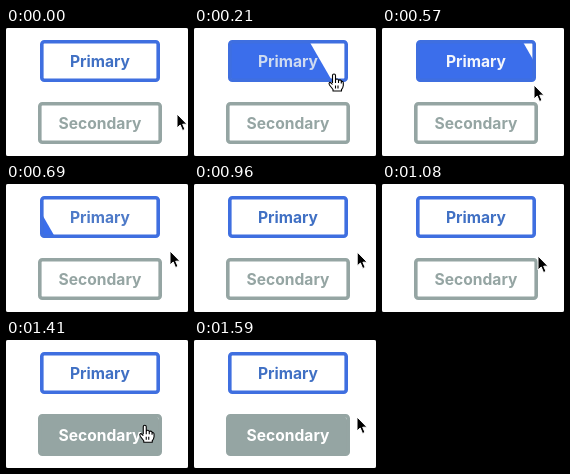
Animation, 182 px wide and 128 px high, one loop 1620 ms. Source, as an HTML page:

```html
<!DOCTYPE html>
<html lang="en">
<head>
<meta charset="utf-8">
<title>Button hover wipe</title>
<style>
  html, body { margin: 0; height: 100%; overflow: hidden; background: #fff; }
  svg { display: block; width: 100vw; height: 100vh; }
  text { font: 700 15.6px Inter, Roboto, sans-serif; text-anchor: middle; }
</style>
</head>
<body>
<svg viewBox="0 0 182 128">
  <clipPath id="clip1"><rect x="37" y="15" width="114" height="36" rx="1"/></clipPath>
  <clipPath id="clip2"><rect x="35" y="77" width="118" height="36" rx="1"/></clipPath>
  <g id="primary">
    <polygon fill="#3b6eeb" clip-path="url(#clip1)"/>
    <rect x="35.8" y="13.8" width="116.4" height="38.4" rx="2.5" fill="none" stroke="#3f6fe0" stroke-width="3.6"/>
    <text x="94" y="38.7">Primary</text>
  </g>
  <g id="secondary">
    <polygon fill="#95a5a3" clip-path="url(#clip2)"/>
    <rect x="33.8" y="75.8" width="120.4" height="38.4" rx="2.5" fill="none" stroke="#95a5a3" stroke-width="3.6"/>
    <text x="94" y="100.7">Secondary</text>
  </g>
  <path fill="#777" d="M0 0h1.5L0 1.5zM182 0v1.5L180.500 0zM0 128v-1.500L1.500 128zM182 128h-1.500L182 126.500z"/>
  <path id="arrow" fill="#000" stroke="#fff" stroke-width="1" stroke-linejoin="round"
    d="M0 0V14L3.200 11L5.500 16.500L8 15.400L5.700 10.200H10z"/>
  <path id="hand" fill="#fff" stroke="#000" stroke-width="1.100" stroke-linejoin="round"
    d="M-1.500 9V1.500Q-1.500 0 0 0T1.500 1.500V6Q2 4.800 3.200 5T4.500 6.500Q5.500 5.500 6.500 6T7.300 7.500Q9.300 7 9.300 9V11.500Q9 14 7.500 15.500V17H-1V15.500L-4.500 11Q-5.500 9 -4.500 8.500T-1.500 10.500M1.500 6V9M4.500 6.500V9M7.300 7.500V9.500M1.500 11.500V14.500M4 11.500V14.500"/>
</svg>
<script>
const LOOP = 1620, STEP = 30, WIPE = 200, SLANT = Math.tan(Math.PI / 6);
const $ = id => document.getElementById(id);
const clamp = v => Math.max(0, Math.min(1, v));
const mix = (a, b, p) => a + (b - a) * p;

// time, x, y of the pointer tip
const route = [
  [30, 171, 86], [120, 151, 55], [210, 140, 46], [420, 142, 45],
  [540, 142, 45], [570, 152, 57], [690, 164, 67], [750, 165, 67],
  [930, 165, 67], [1080, 156, 72], [1140, 148, 77], [1230, 132, 86],
  [1470, 141, 85], [1590, 163, 77]
];

// CSS "ease": cubic-bezier(.25, .1, .25, 1)
function ease(x) {
  x = clamp(x);
  const curve = (a, b, u) => 3 * a * u * (1 - u) ** 2 + 3 * b * u * u * (1 - u) + u ** 3;
  let lo = 0, hi = 1;
  for (let i = 0; i < 20; i++) {
    const mid = (lo + hi) / 2;
    if (curve(.25, .25, mid) < x) lo = mid; else hi = mid;
  }
  return curve(.1, 1, lo);
}

function pointerAt(t) {
  let i = 1;
  while (i < route.length - 1 && route[i][0] < t) i++;
  const [t0, x0, y0] = route[i - 1], [t1, x1, y1] = route[i];
  const p = clamp((t - t0) / (t1 - t0));
  return [mix(x0, x1, p), mix(y0, y1, p)];
}

function drawButton(id, left, right, top, rgb, p) {
  const bottom = top + 34, lean = 34 * SLANT;
  const edge = mix(left - lean, right, p);
  const [shape, , label] = $(id).children;
  shape.setAttribute("points", p > 0
    ? `${left - 30},${top - 2} ${edge - 2 * SLANT},${top - 2} ${edge + lean + 2 * SLANT},${bottom + 2} ${left - 30},${bottom + 2}`
    : "");
  label.setAttribute("fill", `rgb(${rgb.map(c => Math.round(mix(c, 255, p)))})`);
}

function primaryFill(t) {
  if (t < 555) return ease((t - 120) / WIPE);
  // the last sliver lingers until the pointer moves again
  return t < 960 ? 1 - ease((Math.min(t, 690) - 555) / WIPE) : 0;
}

function draw(now) {
  const t = Math.floor(now % LOOP / STEP) * STEP;
  drawButton("primary", 38, 150, 16, [64, 112, 196], primaryFill(t));
  drawButton("secondary", 36, 152, 78, [149, 165, 163], ease((t - 1140) / WIPE));
  const [x, y] = pointerAt(t);
  const over = t >= 120 && t < 555 || t >= 1140 && t < 1560;
  for (const [id, shown] of [["arrow", !over], ["hand", over]]) {
    $(id).setAttribute("transform", `translate(${x} ${y})`);
    $(id).style.display = shown ? "" : "none";
  }
}

const start = performance.now();
function tick() {
  draw(performance.now() - start);
  requestAnimationFrame(tick);
}
tick();
</script>
</body>
</html>
```
